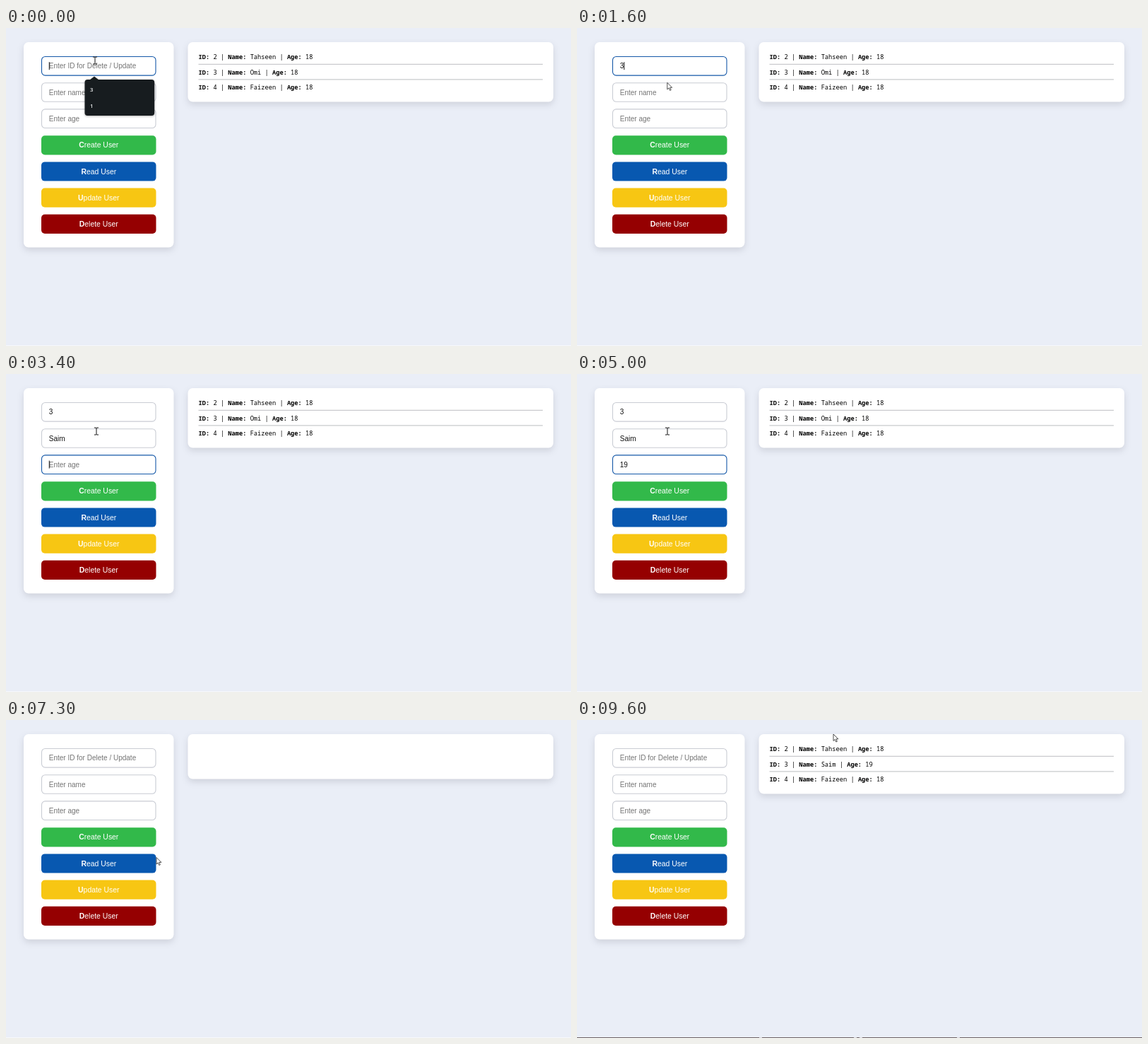
An HTML page that plays this animation: 800 px wide and 450 px high, repeating every 9700 ms.

```html
<!DOCTYPE html>
<html lang="en">
<head>
<meta charset="utf-8">
<title>User form</title>
<style>
  html, body { margin: 0; width: 100%; height: 100%; overflow: hidden; background: #eaeef7; }
  svg { display: block; width: 100vw; height: 100vh; }
  text { white-space: pre; }
  .sans { font: 10px "Liberation Sans", Arial, sans-serif; }
  .btn { font: 10.42px "Liberation Sans", Arial, sans-serif; fill: #fff; text-anchor: middle; }
  .mono { font: 8.71px "Noto Sans Mono", monospace; fill: #000; }
  .pop { font: 600 7.7px "Open Sans", "Noto Sans", sans-serif; fill: #eef0f1; }
  .b { font-weight: 700; }
  .panel { fill: #fff; filter: drop-shadow(0 4px 5px rgba(20, 25, 40, .13)); }
</style>
</head>
<body>
<svg id="stage" viewBox="0 0 800 450"></svg>
<script>
const LOOP = 9700, STEP = 100;
const stage = document.getElementById("stage");

function set(el, attrs) {
  for (const k in attrs) el.setAttribute(k, attrs[k]);
  return el;
}
function add(parent, tag, attrs, text) {
  const el = set(document.createElementNS("http://www.w3.org/2000/svg", tag), attrs);
  if (text !== undefined) el.textContent = text;
  parent.appendChild(el);
  return el;
}
function rect(parent, x, y, width, height, rx, attrs) {
  return add(parent, "rect", { x, y, width, height, rx, ...attrs });
}
const show = (el, on) => el.setAttribute("display", on ? "inline" : "none");
const clamp = v => Math.max(0, Math.min(1, v));

rect(stage, 0, 0, 800, 450, 0, { fill: "#eaeef7" });
rect(stage, 0, 449, 800, 1, 0, { fill: "#f7f8fb" });
rect(stage, 25, 20, 212.5, 290.5, 7, { class: "panel" });

// Form
const BOX = { x: 50, w: 162.5, h: 27.2 };
const rowY = i => 40.2 + 37.2 * i;

const fields = ["Enter ID for Delete / Update", "Enter name", "Enter age"].map((hint, i) => {
  const y = rowY(i);
  return {
    hint, y,
    box: rect(stage, BOX.x + .5, y + .3, BOX.w - 1, BOX.h - .6, 5, { fill: "#fff", "stroke-width": 1.1 }),
    text: add(stage, "text", { x: 60.8, y: y + 17.1, class: "sans" }),
    caret: rect(stage, 61, y + 8, .9, 11, 0, { fill: "#000" })
  };
});

const buttons = [
  ["Create", "#32b94a", "#28953c"],
  ["Read", "#0858b0", "#064a94"],
  ["Update", "#f7c613", "#d9ad06"],
  ["Delete", "#950001", "#740001"]
].map(([name, color, hover], i) => {
  const y = rowY(i + 3) + .4;
  const box = rect(stage, BOX.x, y, BOX.w, BOX.h, 5);
  const label = add(stage, "text", { x: 131.3, y: y + 17.1, class: "btn" });
  add(label, "tspan", { class: "b" }, name[0]);
  add(label, "tspan", {}, name.slice(1) + " User");
  return { y, box, color, hover };
});

// Output
const output = rect(stage, 257.5, 20, 517.5, 84.5, 7, { class: "panel" });

function userRow(parent, i, id, name, age) {
  const row = add(parent, "text", { x: 272.5, y: 44 + 21.6 * i, class: "mono" });
  const parts = `ID:~ ${id} | ~Name:~ ${name} | ~Age:~ ${age}`.split("~");
  parts.forEach(p => add(row, "tspan", p.endsWith(":") ? { class: "b" } : {}, p));
}
function userList(second) {
  const g = add(stage, "g", {});
  [[2, "Tahseen", 18], second, [4, "Faizeen", 18]].forEach((u, i) => {
    userRow(g, i, ...u);
    if (i) rect(g, 272.5, 29.2 + 21.6 * i, 487.5, 1, 0, { fill: "#bcbdc1" });
  });
  return g;
}
const before = userList([3, "Omi", 18]);
const after = userList([3, "Saim", 19]);
const message = add(stage, "text", { x: 272.5, y: 44, class: "mono" }, "SUCESS!");

// Suggestion popups
function popup(y, items) {
  const h = 22.5 * items.length + 6;
  const g = add(stage, "g", { style: "filter:drop-shadow(0 1px 1.5px rgba(0,0,0,.3))" });
  rect(g, 111.5, y, 98.7, h, 4, { fill: "#171c1f" });
  add(g, "path", { d: `M118.5 ${y + .5}l6.5-5 6.5 5z`, fill: "#171c1f" });
  items.forEach((s, i) => add(g, "text", { x: 119, y: y + 17.1 + 22.5 * i, class: "pop" }, s));
  return { g, cy: y + h / 2 };
}
const idPopup = popup(73, ["3", "1"]);
const namePopup = popup(110.6, ["Tahseen", "HELLO", "buddy", "Omi", "Boorla", "BOORAL"]);

function fade({ g, cy }, k) {
  show(g, k > 0);
  const s = .938 + .062 * k;
  set(g, { opacity: k, transform: `translate(160.8 ${cy}) scale(${s}) translate(-160.8 ${-cy})` });
}

// Taskbar edge
const taskbar = add(stage, "g", {});
rect(taskbar, 0, 449, 800, 1, 0, { fill: "#6e6264" });
[258, 392, 400, 538].forEach(x => rect(taskbar, x, 449, 4, 1, 0, { fill: "#d8d6da" }));

// Pointers, each with its hot spot at 0,0
const outline = { fill: "#fff", stroke: "#222", "stroke-width": .8, "stroke-linejoin": "round" };
const pointers = {
  beam: add(stage, "path", {
    d: "M-3-5h2.2l.8.7.8-.7H3M0-4.3V4.3M-3 5h2.2l.8-.7.8.7H3",
    fill: "none", stroke: "#111", "stroke-width": 1
  }),
  arrow: add(stage, "path", { d: "M0 0v9.5l2.2-2 1.6 3.5 1.6-.7-1.6-3.4h3.1z", ...outline }),
  hand: add(stage, "path", {
    d: "M-1 .6q1-1.4 1.8 0v3.6l1.2-.3 1.3.5 1.2.2.9.7v3l-1 2.4H0L-2.9 6.7q.2-1.5 1.9-.1z", ...outline
  })
};

const path = [
  [0, 126, 46], [1200, 126, 46], [1700, 128, 81], [5200, 128, 81],
  [5500, 288, 67], [5600, 288, 67], [6000, 162, 236], [6550, 162, 236],
  [6800, 120, 3], [6920, 120, 3], [7300, 213, 194.5], [7600, 160, 203],
  [8200, 160, 203], [8800, 380, 62], [9100, 380, 62], [9600, 363, 20], [LOOP, 363, 20]
];
function pointerAt(t) {
  const i = Math.max(1, path.findIndex(p => p[0] > t));
  const [t0, x0, y0] = path[i - 1], [t1, x1, y1] = path[i];
  const k = clamp((t - t0) / (t1 - t0)), e = k * k * (3 - 2 * k);
  return [x0 + (x1 - x0) * e, y0 + (y1 - y0) * e];
}

// Typing and focus
const CLEAR = 6900;
const typing = [
  { text: "3", keys: [600], from: 0, to: 1700 },
  { text: "Saim", keys: [2300, 2550, 2750, 2950], from: 1700, to: 3400 },
  { text: "19", keys: [4300, 4500], from: 3400, to: 6200 }
];

function drawField(f, { text, keys, from, to }, t) {
  const count = t < CLEAR ? keys.filter(k => k <= t).length : 0;
  const focus = t >= from && t < to;
  f.text.textContent = count ? text.slice(0, count) : f.hint;
  f.text.setAttribute("fill", count ? "#111" : "#757575");
  f.box.setAttribute("stroke", focus ? "#1458a8" : "#c9ccd4");
  const last = Math.max(from, ...keys.filter(k => k <= t));
  show(f.caret, focus && (t - last) % 1000 < 500);
  f.caret.setAttribute("x", 60.8 + (count ? f.text.getComputedTextLength() : 0));
}

function draw(t) {
  fields.forEach((f, i) => drawField(f, typing[i], t));
  fade(idPopup, clamp(1 - (t - 600) / 139));
  fade(namePopup, t < 2400 ? clamp((t - 1700) / 150) : clamp(1 - (t - 2400) / 139));

  const done = t >= 6300, list = t >= 7800;
  show(before, !done);
  show(message, done && t < CLEAR);
  show(after, list);
  output.setAttribute("height", !done || list ? 84.5 : t < CLEAR ? 41.3 : 63.5);
  show(taskbar, t >= 9600);

  const [x, y] = pointerAt(t);
  const inside = o => x >= BOX.x && x <= BOX.x + BOX.w && y >= o.y && y <= o.y + BOX.h;
  const overText = (!done || list) && x > 272 && x < 434 && y > 36 && y < 90;
  const kind = buttons.some(inside) ? "hand" : overText || fields.some(inside) ? "beam" : "arrow";
  buttons.forEach(b => b.box.setAttribute("fill", inside(b) ? b.hover : b.color));
  for (const k in pointers) show(pointers[k], k === kind);
  pointers[kind].setAttribute("transform", `translate(${x} ${y})`);
}

const start = performance.now();
function tick() {
  const t = (performance.now() - start) % LOOP;
  draw(Math.floor(t / STEP) * STEP);
  requestAnimationFrame(tick);
}
tick();
</script>
</body>
</html>
```
